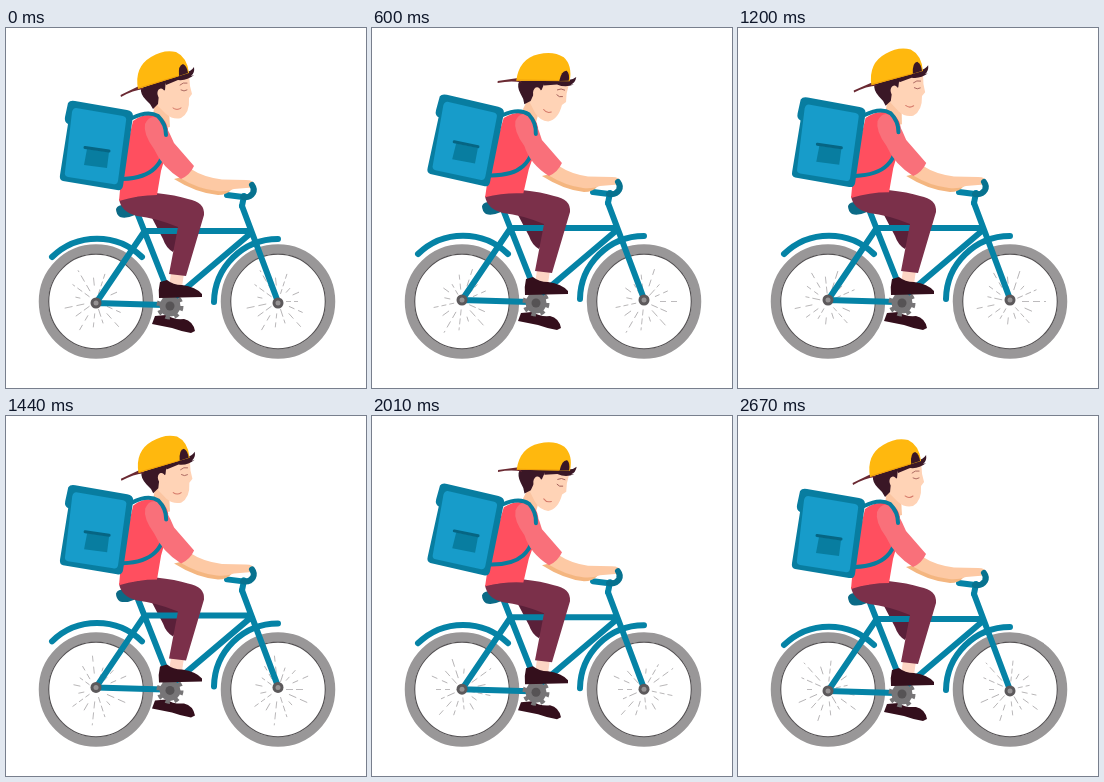
An HTML page for the animation above (2.7 s loop, 360 by 360 pixels).

```html
<!DOCTYPE html>
<html lang="en">
<head>
<meta charset="utf-8">
<title>Delivery cyclist</title>
<style>
html, body { margin: 0; width: 100%; height: 100%; overflow: hidden; background: #fff; }
svg { display: block; width: 100vw; height: 100vh; }
.tube { fill: none; stroke: #0583a6; stroke-width: 6; stroke-linecap: round; stroke-linejoin: round; }
.thin { fill: none; stroke-linecap: round; }
</style>
</head>
<body>
<svg viewBox="0 0 360 360">
  <g id="wheels"></g>

  <g id="rider">
    <!-- far leg and shoe -->
    <path fill="#5a2039" d="M146 190L172 192L173 212L167 224Q160 220 157 211Z"/>
    <path fill="#340f1c" d="M149 288L160 287Q168 292 178 291Q187 293 189 303L185 305Q174 303 166 300L146 296Z"/>

    <!-- bicycle -->
    <path class="tube" d="M46 229A64.5 64.5 0 0 1 136 229M208 274A64 64 0 0 1 272 211"/>
    <path class="tube" d="M90 275L138 204M90 275L158 277M132 187L160 258L164 270M138 203H243M166 272L245 205M236 178L272 274"/>
    <path class="tube" d="M221 167L237 169M238 168L236 178"/>
    <path fill="#0b6a86" d="M110 181Q112 176 122 177L139 181Q138 186 129 187Q120 191 114 189Q110 186 110 181Z"/>
    <g id="hubs"></g>
    <circle cx="164" cy="278" r="10.5" fill="#777577"/>
    <circle cx="164" cy="278" r="11.5" fill="none" stroke="#777577" stroke-width="4" stroke-dasharray="4.5 4.53"/>
    <circle cx="164" cy="278" r="4.5" fill="#565355"/>

    <!-- near leg -->
    <path fill="#fdd5c4" d="M165 245H178L176 259H163Z"/>
    <path fill="#7b304a" d="M113 171L150 165Q170 167 182 171Q199 174 198 187L180 248L163 246L172 199Q150 190 131 188Q115 184 113 171Z"/>
    <path fill="#340f1c" d="M154 254L161 252Q167 257 176 257Q190 259 196 266V269L153 270Q152 262 154 254Z"/>

    <path id="farArm" fill="#f4b680"/>
    <g id="head">
      <path fill="#fbc5a1" d="M150 66L163 82L164 99Q154 102 146 95Z"/>
      <path fill="#ffd3b6" d="M150 54L183 45L184 58L186 66L183 70Q184 85 175 90Q167 92 160 86L151 77Z"/>
      <path fill="#3a1726" d="M135 60L160 51L159 62L153 66L152 76L147 81Q145 76 140 72Q134 66 135 60Z"/>
      <path fill="#3a1726" d="M158 52L178 44Q184 45 188 39Q189 45 185 48L188 47Q181 53 172 52L160 57Z"/>
      <ellipse cx="155.500" cy="66" rx="4" ry="5.500" fill="#ffd3b6" transform="rotate(-15 155.5 66)"/>
      <path fill="#6a2932" d="M114.500 67L133 58L138 61Q127 62 115 69Z"/>
      <path fill="#ffb80e" d="M132 61Q128 39 145 29Q158 21 170 24Q181 29 183 45Z"/>
      <path fill="#3a1726" d="M173 48Q172 37 177 36Q181 38 182 45Z"/>
      <path class="thin" stroke="#ee9e0a" stroke-width="1" d="M133 60L172 48"/>
      <path class="thin" stroke="#a5605a" stroke-width=".9" d="M174 57Q177 54 181 55M175 62Q178 64 181 62"/>
      <path class="thin" stroke="#d57868" stroke-width="1" d="M167 80Q171 83 175 80"/>
    </g>
    <g id="body">
      <path fill="#ff4f5f" d="M127 93Q138 85 151 87Q160 91 162 101Q161 125 155 143L151 167Q132 167 113 173L116 140Z"/>
      <path class="thin" stroke="#087d9e" stroke-width="4" d="M157 126Q155 134 149 140Q139 150 117 151"/>
      <path fill="#087da0" d="M62 75Q64 72 69 73L121 82Q127 83 127 88L117 158Q116 163 111 162L57 153Q53 152 54 147L62 96Q58 94 59 89Z"/>
      <path fill="#179cca" d="M70 80L117 88Q121 89 120 93L112 153Q111 157 107 156L62 149Q58 148 59 144L66 84Q67 80 70 80Z"/>
      <path fill="#087da0" d="M81 121L103 124L101 140L78 137Z"/>
      <path class="thin" stroke="#066583" stroke-width="3" d="M79 119.500L103 123"/>
    </g>
    <path id="forearm" fill="#fdc9a4"/>
    <path id="sleeve" fill="#f9707a"/>
    <g id="strap">
      <path class="thin" stroke="#087d9e" stroke-width="4" d="M126 90Q142 82 152 88Q160 96 160 107"/>
    </g>
    <path class="thin" stroke="#07728f" stroke-width="6" d="M237 169Q244 170 247 165Q249 161 246 157"/>
  </g>
</svg>
<script>
const LOOP = 2700, STEP = 30;
const $ = id => document.getElementById(id);
const hubX = [90, 272], hubY = 273.5;

function spokes() {
  let out = '';
  for (let i = 0; i < 15; i++) {
    const reach = 20 + (i * 7) % 18;
    out += `<path d="M${8 + i % 3 * 4} 0H${reach}" transform="rotate(${i * 24})" stroke-dasharray="${5 + i % 4} ${3 + i % 3}"/>`;
  }
  return out;
}

$('wheels').innerHTML = hubX.map(x => `<g transform="translate(${x} ${hubY})">
  <circle r="52.5" fill="none" stroke="#999798" stroke-width="9.5"/>
  <circle r="47.3" fill="none" stroke="#555254" stroke-width="1.2"/>
  <g class="spin" stroke="#918e90" stroke-width=".6">${spokes()}</g></g>`).join('');
$('hubs').innerHTML = hubX.map(x => `<circle cx="${x}" cy="275" r="5.5" fill="#5c595b"/>
  <circle cx="${x}" cy="275" r="2.5" fill="#969394"/>`).join('');
const spin = document.querySelectorAll('.spin');

const wave = (t, period) => (1 - Math.cos(2 * Math.PI * t / period)) / 2;
const turn = (id, deg, x, y) => $(id).setAttribute('transform', `rotate(${deg} ${x} ${y})`);

function draw(t) {
  const lean = wave(t, 1350), lift = wave(t, 900) * 4;
  $('rider').setAttribute('transform', `translate(0 ${-lift})`);
  turn('head', 18.5 * lean, 155, 97);
  turn('body', 3.4 * lean, 128, 174);
  turn('strap', 3.4 * lean, 128, 174);

  const s = 4.5 * lean, e = 2 * lean;
  $('sleeve').setAttribute('d', `M${139 + s} 96Q${144 + s} 85 ${154 + s} 91Q${160 + s} 96 ${168 + e} 115L${188 + e} 138Q${184 + e} 147 ${175 + e} 151Q${156 + e} 139 ${148 + s} 121Q${137 + s} 106 ${139 + s} 96Z`);
  $('forearm').setAttribute('d', `M${185 + e} 141Q${197 + e} 149 216 151.500L240 152Q248 152 248 157Q247 160 240 160L228 161Q220 164 211 163Q${192 + e} 161 ${174 + e} 150Z`);
  $('farArm').setAttribute('d', `M${168 + e} 151L${180 + e} 148L226 161Q221 167 212 167Q${190 + e} 165 ${168 + e} 151Z`);
  spin.forEach(g => g.setAttribute('transform', `rotate(${360 * t / 900})`));
}

const start = performance.now();
function tick() {
  const t = (performance.now() - start) % LOOP;
  draw(Math.floor(t / STEP) * STEP);
  requestAnimationFrame(tick);
}
tick();
</script>
</body>
</html>
```
